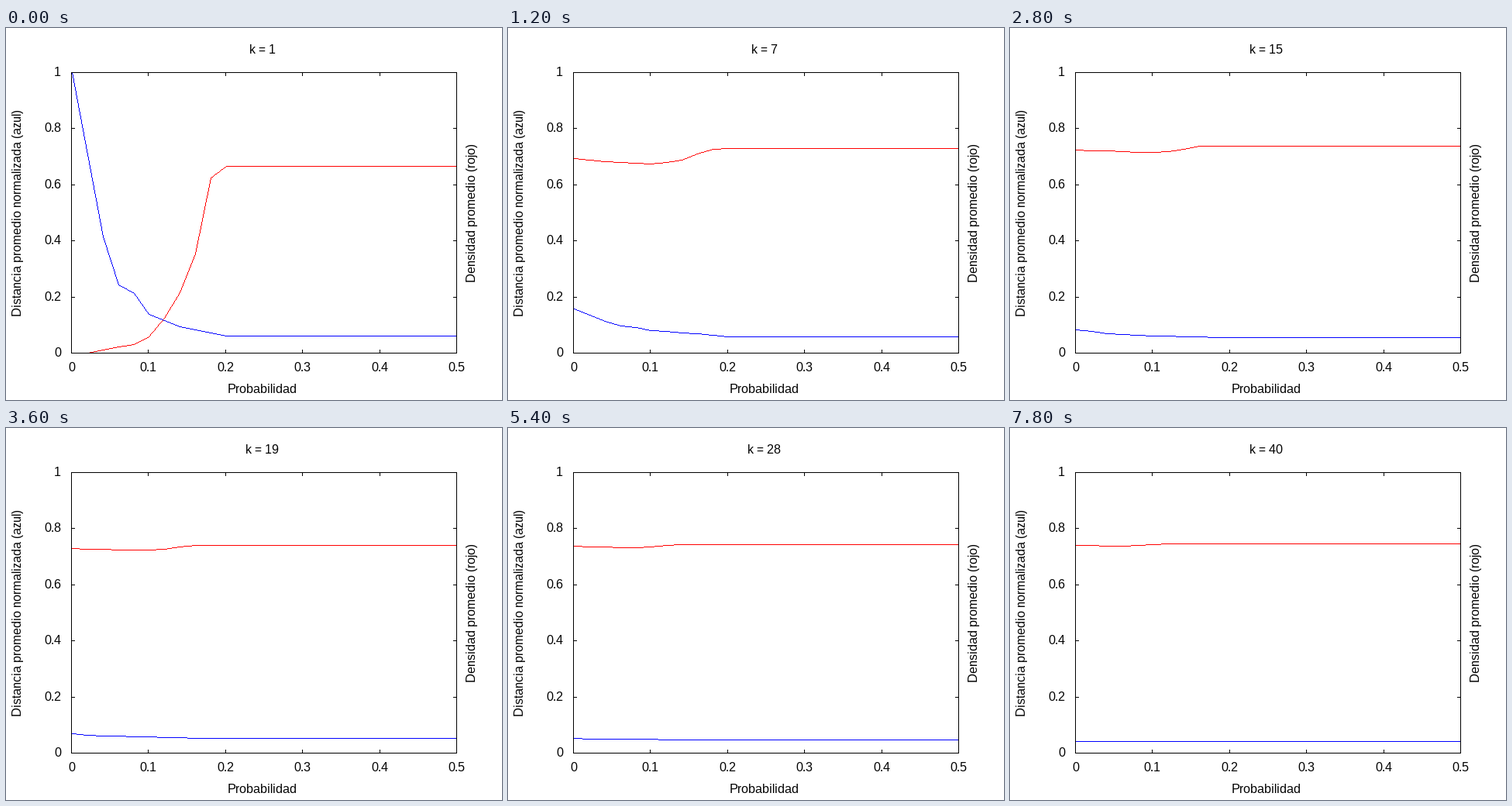
Recreate the animation shown at these times as a matplotlib script. Size 640 by 480 pixels, loop 8000 ms.

```python
import numpy as np
import matplotlib.pyplot as plt
from matplotlib.animation import FuncAnimation

W, H, DPI = 640, 480, 100
PX = 72 / DPI
LEFT, RIGHT, TOP, BOTTOM = 84, 581, 57, 419

plt.rcParams.update({
    "font.family": "Liberation Sans",
    "font.size": 16 * PX,
    "text.hinting": "default",
    "text.hinting_factor": 1,
    "path.simplify": False,
})

STEPS = np.arange(11)
# Key points (position 0..10, level 0..1) of the fall and rise at k = 1.
FALL = [(0, 1), (2, .376), (3, .194), (4, .162), (5, .082), (7, .035), (10, 0)]
RISE = [(1, 0), (4, .047), (5, .087), (6, .186), (7, .324), (8, .529),
        (9, .937), (10, 1)]


def col(p):
    return np.round(LEFT + (RIGHT - LEFT) * np.asarray(p) / 0.5)


def row(v):
    return np.round(BOTTOM - (BOTTOM - TOP) * np.asarray(v))


def profile(keys, k):
    """Key profile, shortened as k grows so that it levels off earlier."""
    reach = 10 - 0.11 * (k - 1)
    return np.interp(10 * STEPS / reach, *zip(*keys))


def distance(k):
    start, end = 0.984 / k + 0.016, 0.061 - 0.0005 * (k - 1)
    return end + (start - end) * profile(FALL, k) ** (k ** -0.3)


def density(k):
    """Lattice clustering that dips slightly, then rises to its limit."""
    base = 0.75 * (1 - 1 / (2 * k - 1)) * (1 - 0.05 * STEPS / k)
    end = 0.751 - 0.085 * k ** -0.7
    return base + (end - base) * profile(RISE, k)


XS = np.append(col(0.001 + 0.02 * STEPS), RIGHT)


def trace(xs, ys):
    """Pixel columns and rows along a polyline, one per step of the long axis."""
    px, py = [], []
    for x0, y0, x1, y1 in zip(xs, ys, xs[1:], ys[1:]):
        n = int(max(abs(x1 - x0), abs(y1 - y0))) + 1
        px.append(np.round(np.linspace(x0, x1, n)))
        py.append(np.round(np.linspace(y0, y1, n)))
    return np.concatenate(px), np.concatenate(py)


def dashes(px, py):
    """One short horizontal dash inside each pixel."""
    gap = np.full(len(px), np.nan)
    xs = np.column_stack([px + 0.05, px + 0.95, gap]).ravel()
    ys = np.column_stack([py + 0.5, py + 0.5, gap]).ravel()
    return xs, ys


fig = plt.figure(figsize=(W / DPI, H / DPI), dpi=DPI, facecolor="white")
ax = fig.add_axes([0, 0, 1, 1])
ax.set_xlim(0, W)
ax.set_ylim(H, 0)
ax.axis("off")


def line(xs, ys, color="black", width=1.0, cap="projecting", z=5):
    return ax.plot(xs, ys, color=color, lw=width * PX, antialiased=False,
                   snap=False, zorder=z, solid_capstyle=cap,
                   solid_joinstyle="miter")[0]


def rule(xs, ys):
    line(np.asarray(xs) + 0.5, np.asarray(ys) + 0.5)


def label(x, y, text, ha="center", angle=0):
    return ax.text(x, y, text, ha=ha, va="baseline", rotation=angle,
                   rotation_mode="anchor", color="black")


def draw_axes():
    rule([LEFT, RIGHT, RIGHT, LEFT, LEFT], [TOP, TOP, BOTTOM, BOTTOM, TOP])
    for i in range(6):
        x, y = col(i / 10), row(i / 5)
        for edge, step in ((TOP, 4), (BOTTOM, -4)):
            rule([x, x], [edge, edge + step])
        for edge, step in ((LEFT, 4), (RIGHT, -4)):
            rule([edge, edge + step], [y, y])
        label(x + 0.5, 443, f"{i / 10:g}")
        label(71, y + 5, f"{i / 5:g}", ha="right")
    label(330.5, 471, "Probabilidad")
    label(20, 238, "Distancia promedio normalizada (azul)", angle=90)
    label(606, 238, "Densidad promedio (rojo)", angle=90)


draw_axes()
title = label(330.5, 33, "")
curves = [(density, line([], [], "#ff0000", 0.9, "butt", 2)),
          (distance, line([], [], "#0000ff", 0.9, "butt", 3))]


def update(frame):
    k = frame + 1
    title.set_text(f"k = {k}")
    for values, art in curves:
        ys = row(values(k))
        art.set_data(*dashes(*trace(XS, np.append(ys, ys[-1]))))
    return []


anim = FuncAnimation(fig, update, frames=40, interval=200,
                     repeat=True, repeat_delay=0, blit=False)
plt.show()
```
